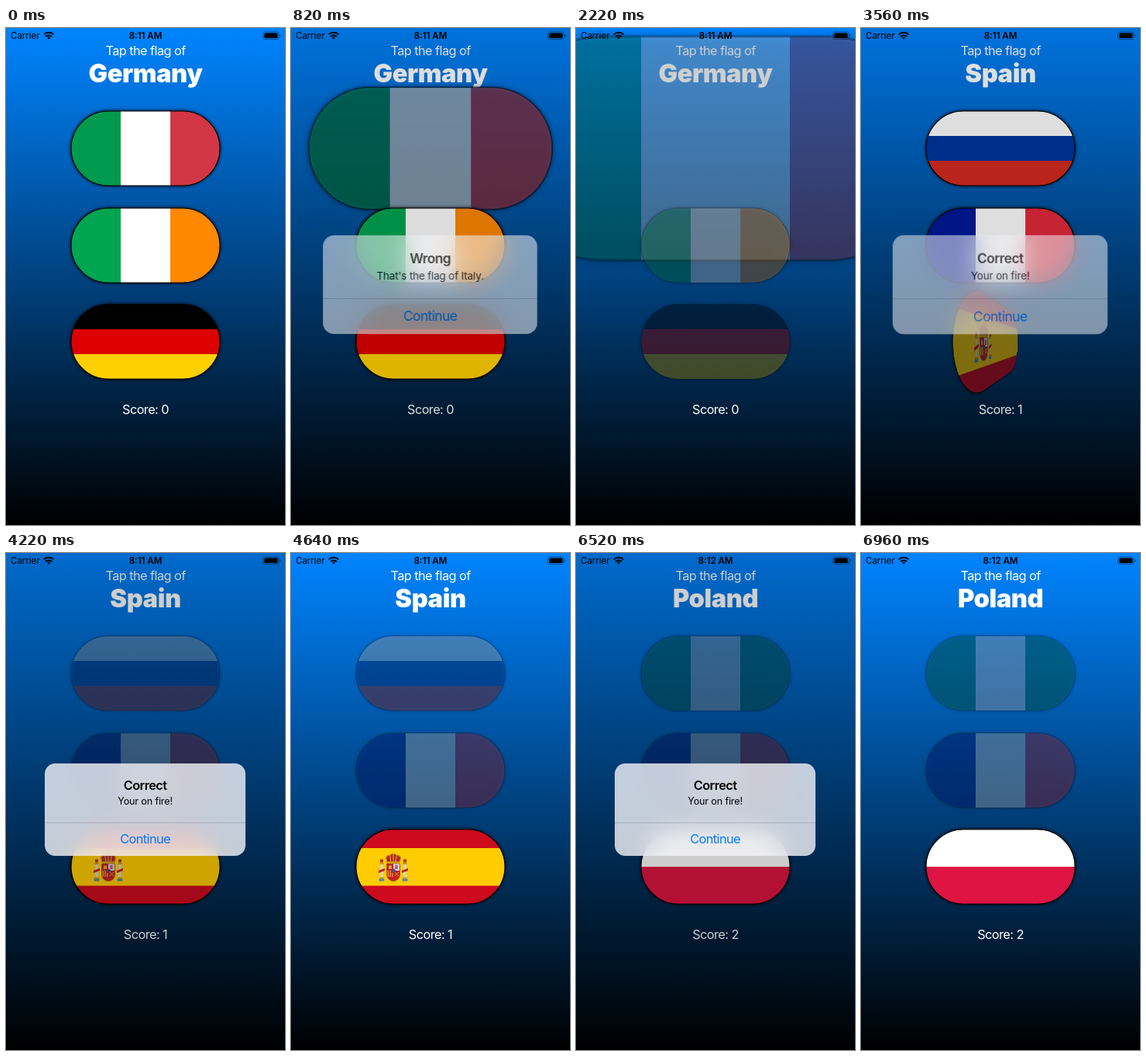
Animation, 360 px wide and 640 px high, one loop 8 s. Source, as an HTML page:

```html
<!DOCTYPE html>
<html lang="en">
<head>
<meta charset="utf-8">
<title>Flag quiz</title>
<style>
  html, body { margin: 0; width: 100%; height: 100%; overflow: hidden; background: #000; }
  #stage { position: relative; width: 360px; height: 640px; overflow: hidden; font-family: Inter, Roboto, sans-serif; }
  #stage > svg, #dim { position: absolute; left: 0; top: 0; }
  #stage > .flag { left: 84px; width: 192px; height: 96px; overflow: visible; }
  .shadow { filter: blur(2px); }
  text { text-anchor: middle; }
  .body { font-size: 16.3px; letter-spacing: -0.55px; }
  .title { font-size: 32.6px; font-weight: 900; letter-spacing: -0.4px; }
  .status { font-size: 11.5px; }
  #dim { width: 360px; height: 640px; background: #000; }
  #alert {
    position: absolute; left: 50.4px; top: 270.7px; width: 259.2px; height: 118.6px;
    border-radius: 13.4px; overflow: hidden; background: rgba(244, 245, 248, 0.82);
    -webkit-backdrop-filter: blur(14px); backdrop-filter: blur(14px);
  }
  #alert svg { display: block; }
</style>
</head>
<body>
<div id="stage">
  <svg width="360" height="640">
    <defs>
      <linearGradient id="sky" x1="0" y1="0" x2="0" y2="1">
        <stop offset="0" stop-color="#0084ff"/><stop offset="1" stop-color="#000"/>
      </linearGradient>
    </defs>
    <rect width="360" height="640" fill="url(#sky)"/>
    <g fill="#fff">
      <text class="body" x="180" y="35">Tap the flag of</text>
      <text class="title" id="country" x="180" y="70"></text>
      <text class="body" id="score" x="180" y="497"></text>
    </g>
  </svg>
  <svg class="flag" style="top:107px"></svg>
  <svg class="flag" style="top:232px"></svg>
  <svg class="flag" style="top:356px"></svg>
  <svg width="360" height="20">
    <text class="status" x="6" y="14" style="text-anchor:start">Carrier</text>
    <text class="status" id="clock" x="180" y="14" font-weight="600"></text>
    <g fill="none" stroke="#000" stroke-width="2">
      <path d="M48.8 8.4a9 9 0 0 1 12.6 0M51.2 11a5.6 5.6 0 0 1 7.8 0"/>
    </g>
    <path d="M55.1 14.6l-2-2.1a2.9 2.9 0 0 1 4 0z"/>
    <rect x="331.6" y="5" width="20.6" height="9.6" rx="2.6" fill="none" stroke="#000" stroke-opacity=".4"/>
    <rect x="333.3" y="6.6" width="17.2" height="6.4" rx="1.5"/>
    <path d="M353.4 8.2a1.7 1.7 0 0 1 0 3.2z" fill-opacity=".5"/>
  </svg>
  <div id="dim"></div>
  <div id="alert">
    <svg width="259.2" height="118.6" viewBox="-129.6 -59.3 259.2 118.6">
      <text class="body" id="head" y="-25.4" font-weight="600"></text>
      <text id="note" y="-6.1" font-size="12.5" letter-spacing="-.1"></text>
      <path d="M-130 17H130" stroke="#3c3c43" stroke-opacity=".3" stroke-width=".7"/>
      <text class="body" y="44" fill="#007aff">Continue</text>
    </svg>
  </div>
</div>
<script>
const $ = id => document.getElementById(id);
const LOOP = 8000;

const rect = (x, y, w, h, fill) =>
  `<rect x="${x}" y="${y}" width="${w}" height="${h}" fill="${fill}"/>`;
const columns = (...c) => c.map((f, i) => rect(i * 64, 0, 64.2, 96, f)).join('');
const rows = (...c) => c.map((f, i) => rect(0, i * 96 / c.length, 192, 96 / c.length + 0.2, f)).join('');

const pillar = x =>
  rect(x - 1.7, 45, 3.4, 17, '#d5d5d0') + rect(x - 2.6, 43, 5.2, 2, '#c8961e') +
  rect(x - 2.6, 61.5, 5.2, 2, '#c8961e') + rect(x - 3.4, 63.5, 6.8, 3, '#4a80b5') +
  rect(x - 2, 38.5, 4, 4, '#b5332a') +
  `<path d="M${x - 4} 53l8 -3v3l-8 3z" fill="#c01c22"/>`;

const arms = () =>
  pillar(33) + pillar(63) +
  `<path d="M39.5 44h17v14a8.5 8.5 0 0 1 -17 0z" fill="#c3202b" stroke="#8a5a14" stroke-width=".8"/>` +
  rect(48, 44.4, 8, 8.6, '#dcd6d6') + rect(50.3, 46, 3.4, 5, '#b0568a') +
  rect(42, 46.5, 4, 4.5, '#dba521') +
  [40.6, 43.4, 46.2].map(x => rect(x, 53, 1.3, 8, '#edb51c')).join('') +
  `<path d="M50 55l5 5M55 55l-5 5" stroke="#e0a81c"/>
   <circle cx="48" cy="53.5" r="2.6" fill="#3059a0" stroke="#c3202b"/>
   <path d="M40 42.5l-1.6 -6q2 -4 5.200 -3.300q2 -2 4.400 -2q2.400 0 4.400 2q3.200 -.7 5.200 3.300l-1.600 6z"
     fill="#b3262b" stroke="#c8921c" stroke-width="1.1"/>
   <path d="M48 29.500v12M43.800 33.500l1 8M52.200 33.500l-1 8M39.800 41.800h16.400" stroke="#d9a422" stroke-width="1.200"/>`;

const FLAGS = {
  Italy: columns('#009a4e', '#fff', '#d23645'),
  Ireland: columns('#00a551', '#fff', '#ff8800'),
  Germany: rows('#000', '#dd0000', '#ffd000'),
  Russia: rows('#fff', '#0035a0', '#d52b1e'),
  France: columns('#00199a', '#fff', '#e42a3c'),
  Spain: rect(0, 0, 192, 96, '#cd0a1e') + rect(0, 24, 192, 48.5, '#ffcc00') + arms(),
  Nigeria: columns('#008450', '#fff', '#008450'),
  Poland: rows('#fff', '#de1443')
};

// on: press begins, tap: release, off: alert dismissed; the stepped spans end at onEnd and offEnd
const ROUNDS = [
  { from: 0, on: 590, onEnd: 1150, tap: 677, off: 1770, offEnd: 2220,
    flags: ['Italy', 'Ireland', 'Germany'], answer: 2, pick: 0, score: 0, clock: '8:11 AM' },
  { from: 3340, on: 3340, onEnd: 3890, tap: 3453, off: 4220, offEnd: 4640,
    flags: ['Russia', 'France', 'Spain'], answer: 2, pick: 2, score: 0, clock: '8:11 AM' },
  { from: 5770, on: 5770, onEnd: 6310, tap: 5880, off: 6520, offEnd: 6960,
    flags: ['Nigeria', 'France', 'Poland'], answer: 2, pick: 2, score: 1, clock: '8:12 AM' }
];

const clamp = v => Math.max(0, Math.min(1, v));
const mix = (a, b, p) => a + (b - a) * p;

// cubic-bezier(.42, 0, .58, 1)
function ease(x) {
  x = clamp(x);
  let lo = 0, hi = 1;
  for (let i = 0; i < 24; i++) {
    const u = (lo + hi) / 2, v = 1 - u;
    if (3 * v * v * u * 0.42 + 3 * v * u * u * 0.58 + u * u * u < x) lo = u; else hi = u;
  }
  return lo * lo * (3 - 2 * lo);
}

function spring(ms) {
  const x = Math.max(0, ms) * 0.0163;
  return 1 - (1 + x) * Math.exp(-x);
}

function stepped(t, a, b, n) {
  if (t < a || t >= b) return t;
  const d = (b - a) / (n - 1);
  return a + Math.floor((t - a) / d) * d;
}

const slots = [...document.querySelectorAll('.flag')];
let shown = null;

function deal(r) {
  shown = r;
  const right = r.pick === r.answer;
  $('country').textContent = r.flags[r.answer];
  $('clock').textContent = r.clock;
  $('head').textContent = right ? 'Correct' : 'Wrong';
  $('note').textContent = right ? 'Your on fire!' : `That's the flag of ${r.flags[r.pick]}.`;
  slots.forEach((s, i) => {
    s.innerHTML =
      `<clipPath id="pill${i}"><rect width="192" height="96" rx="48"/></clipPath>
       <g><rect class="shadow" x="-.5" y="-.5" width="193" height="97" rx="48.500"/></g>
       <g clip-path="url(#pill${i})">${FLAGS[r.flags[i]]}</g>
       <g><rect width="192" height="96" rx="48" fill="none" stroke="#000" stroke-width="1.100"/></g>`;
  });
}

function draw(now) {
  const r = ROUNDS.filter(q => now >= q.from).pop();
  if (r !== shown) deal(r);
  let t = stepped(now, r.on, r.onEnd, 6);
  t = stepped(t, r.off, r.offEnd, 5);

  const right = r.pick === r.answer;
  const move = ease((t - r.tap) / 350);
  const fade = mix(1, 0.25, ease((t - r.tap - 130) / 290));
  $('score').textContent = 'Score: ' + (r.score + (right && t >= r.tap ? 1 : 0));

  slots.forEach((s, i) => {
    let alpha = fade, tf = 'none';
    if (i === r.pick) {
      const press = t < r.on ? 1 : mix(0.2, 1, Math.sin(clamp((t - r.tap) / 350) * Math.PI / 2));
      alpha = press * (right ? 1 : mix(1, 0.25, move));
      if (move > 0 && (!right || move < 0.9999))
        tf = right ? `perspective(192px) rotateY(${360 * move}deg)` : `scale(${mix(1, 3, move)})`;
    }
    s.style.transform = tf;
    // Each layer fades by itself, so the shadow shows through the flag
    for (const g of s.querySelectorAll(':scope > g')) g.setAttribute('opacity', alpha);
  });

  const rise = spring(t - r.on - 85);
  const vis = rise * (1 - ease((t - r.off + 40) / 440));
  $('dim').style.opacity = 0.2 * vis;
  $('alert').style.opacity = vis;
  $('alert').style.visibility = vis > 0.002 ? 'visible' : 'hidden';
  $('alert').style.transform = `scale(${mix(1.2, 1, rise)})`;
}

const start = performance.now();
function tick() {
  draw((performance.now() - start) % LOOP);
  requestAnimationFrame(tick);
}
tick();
</script>
</body>
</html>
```
